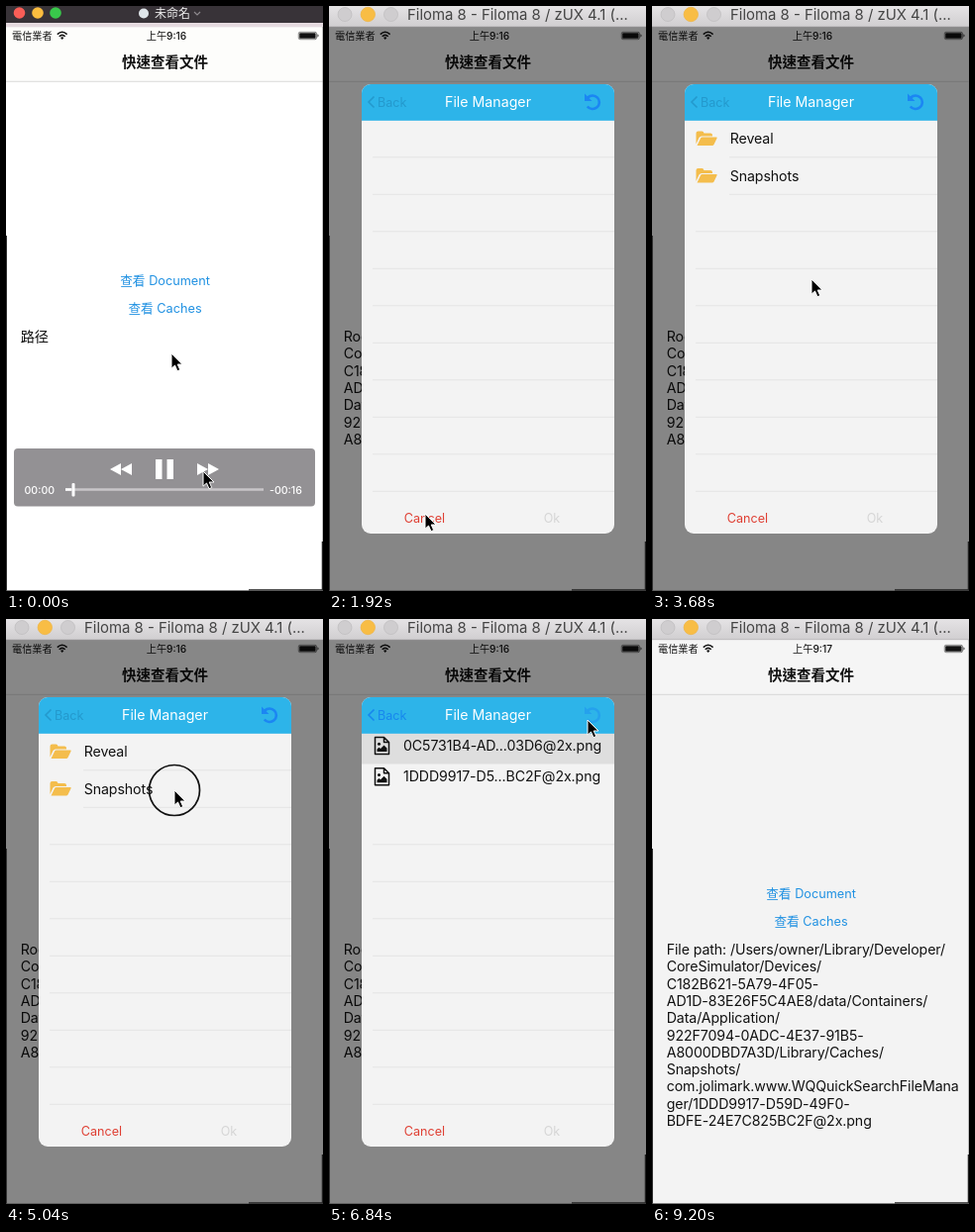
These frames come from a looping animation (320 by 591 pixels, 9.24 s). An HTML page:

```html
<!DOCTYPE html>
<html lang="zh-Hant">
<head>
<meta charset="utf-8">
<style>
html, body { margin: 0; width: 100%; height: 100%; overflow: hidden; background: #fff; }
svg { display: block; width: 100%; height: 100%; }
text { font-family: Inter, "Noto Sans CJK SC", "Noto Sans CJK TC", "Noto Sans CJK", sans-serif; white-space: pre; }
.mid { text-anchor: middle; }
.body { font-size: 14.2px; letter-spacing: -.1px; fill: #111; }
.link { font-size: 12.7px; fill: #2091e2; text-anchor: middle; }
</style>
</head>
<body>
<svg id="stage" viewBox="0 0 320 591" preserveAspectRatio="none">
  <defs>
    <linearGradient id="chrome" x2="0" y2="1">
      <stop stop-color="#e5e3e5"/><stop offset="1" stop-color="#d0ced0"/>
    </linearGradient>
    <clipPath id="card"><rect x="33" y="79" width="255" height="454" rx="9"/></clipPath>
    <path id="arrow" d="M0 0V15.2L3.5 12L6 17.7L8.7 16.5L6.2 11H11Z" stroke="#fff" stroke-width="1" stroke-linejoin="round"/>
    <g id="folder" fill="#f4bd4c">
      <path d="M0 13V2Q0 0 2 0H6Q7.5 0 8 2H14.5Q16.5 2 16.5 4V5H5.5Q4 5 3 6.5Z"/>
      <path d="M1 14.5L4.6 7Q5 6 6.3 6H20.5Q21.5 6 21 7.2L18 13.5Q17.5 14.5 16.3 14.5Z"/>
    </g>
    <g id="picture" fill="none" stroke="#111" stroke-width="1.5" stroke-linejoin="round">
      <path d="M1 1H10L15 6V18H1ZM10 1V6H15"/>
      <path d="M3 15.5V13L5 11.2L6.5 12.5L10 9L13 12V15.5Z" fill="#111" stroke="none"/>
      <circle cx="5" cy="7.7" r="1.5" fill="#111" stroke="none"/>
    </g>
    <g id="transport" fill="#fff">
      <path d="M105 468L116 462V474ZM116 468L127 462V474ZM193 462L204 468L193 474ZM204 462L215 468L204 474Z"/>
      <path d="M151 458H157.500V478H151ZM162.500 458H169V478H162.500Z"/>
    </g>
  </defs>

  <rect id="page" width="320" height="591"/>
  <rect id="nav" y="20" width="320" height="56"/>
  <path d="M0 76.300H320" stroke="#d0d0d0" stroke-width=".8"/>
  <g fill="#111">
    <text x="6" y="33.700" font-size="10.2">電信業者</text>
    <text id="clock" class="mid" x="162" y="33.700" font-size="10.2" font-weight="500"></text>
    <g fill="none" stroke="#111" stroke-width="1.500">
      <path d="M51.800 28.600Q56.700 24 61.600 28.600M53.700 30.800Q56.700 28 59.700 30.800"/>
    </g>
    <path d="M55 32Q56.700 30.700 58.400 32L56.700 34Z"/>
    <rect x="295.300" y="26.300" width="18.200" height="7.400" rx="1.500" fill="none" stroke="#111" stroke-width=".5"/>
    <rect x="296.200" y="27.200" width="16.400" height="5.600" rx=".6"/>
    <path d="M314.500 28.300Q316.500 30 314.500 31.800Z"/>
    <text class="mid" x="160.500" y="62.300" font-size="14.5" font-weight="700">快速查看文件</text>
  </g>
  <text id="doc" class="link" x="160.500" y="282">查看 Document</text>
  <text id="caches" class="link" x="160.500" y="310">查看 Caches</text>
  <g id="info" class="body"></g>

  <g id="ghost">
    <rect x="8" y="447" width="304" height="59" fill="#f2f2f2"/>
    <use href="#transport"/>
  </g>

  <g id="modal">
    <rect y="20" width="320" height="571" fill="#000" opacity=".45"/>
    <g clip-path="url(#card)">
      <rect x="33" y="79" width="255" height="454" fill="#f3f3f3"/>
      <g id="lists"></g>
      <rect x="33" y="79" width="255" height="36.800" fill="#2db4e9"/>
    </g>
    <text class="mid" x="160.500" y="102" font-size="14.2" fill="#fff">File Manager</text>
    <g id="back">
      <path d="M45.500 91.500L40 97L45.500 102.500" fill="none" stroke="currentColor" stroke-width="1.600"/>
      <text x="49" y="101.700" font-size="12.6" fill="currentColor">Back</text>
    </g>
    <g id="reload">
      <path d="M261.200 92.500A6.800 6.800 0 1 1 260.800 101.500" fill="none" stroke="#1b86f3" stroke-width="2.600"/>
      <path d="M258 88.500V96H265.500Z" fill="#1b86f3"/>
    </g>
    <text class="mid" x="96.500" y="521.500" font-size="12.6" fill="#df3f33">Cancel</text>
    <text id="ok" class="mid" x="225" y="521.500" font-size="12.6">Ok</text>
  </g>

  <circle id="ring" r="25.500" fill="none" stroke="#111" stroke-width="1.700"/>
  <use id="cursor" href="#arrow"/>

  <rect width="320" height="21" fill="url(#chrome)"/>
  <path d="M0 20.700H320" stroke="#b5b3b5" stroke-width=".7"/>
  <g stroke="#bebcbe" stroke-width=".7" fill="#cfcdcf">
    <circle cx="16" cy="8.500" r="7"/><circle cx="62.500" cy="8.500" r="7"/>
    <circle cx="39.300" cy="8.500" r="7.200" fill="#f8bd45" stroke="#f0b440"/>
  </g>
  <text x="79" y="14.400" font-size="14.9" fill="#444">Filoma 8 - Filoma 8 / zUX 4.1 (...</text>

  <g id="player">
    <rect width="320" height="21" fill="#e6dbe0"/>
    <rect width="320" height="17" fill="#383338"/>
    <circle cx="13.500" cy="7" r="5.800" fill="#f95e57"/>
    <circle cx="32" cy="7" r="5.800" fill="#fbbd3f"/>
    <circle cx="50" cy="7" r="5.800" fill="#39c84b"/>
    <circle cx="139" cy="7.500" r="5" fill="#dfe5e9"/>
    <text x="150" y="11.500" font-size="12" fill="#eee">未命名</text>
    <path d="M190 6L193 9L196 6" fill="none" stroke="#8e898e" stroke-width="1.200"/>
    <rect x="8" y="447" width="304" height="58.500" rx="4" fill="#939194"/>
    <use href="#transport"/>
    <path d="M60 488.500H260" stroke="#c8c6c9" stroke-width="2.500"/>
    <path d="M60 488.500H66" stroke="#fff" stroke-width="2.500"/>
    <rect x="66.500" y="482" width="3" height="13.500" rx="1" fill="#fff"/>
    <g font-size="10.6" font-weight="500" fill="#fff">
      <text x="18.500" y="492.500">00:00</text><text x="266" y="492.500">-00:16</text>
    </g>
    <use href="#arrow" x="199" y="470"/>
  </g>
  <path d="M.5 232V591" stroke="#333"/>
  <path d="M319.700 21V541" stroke="#888" stroke-width=".6"/>
  <path d="M0 590.600H245" stroke="#555" stroke-width=".8"/>
  <path d="M245 590H319.500V541" fill="none" stroke="#222" stroke-width="1.500"/>
</svg>
<script>
const LOOP = 9240;
const el = id => document.getElementById(id);
const set = (id, attrs) => { for (const k in attrs) el(id).setAttribute(k, attrs[k]); };
const clamp = v => Math.max(0, Math.min(1, v));
const ramp = (t, a, b) => clamp((t - a) / (b - a));
const within = (t, a, b) => t >= a && t < b;
const show = (id, on) => set(id, { visibility: on ? 'inherit' : 'hidden' });

const home = ['/Users/owner/Library/Developer/', 'CoreSimulator/Devices/', 'C182B621-5A79-4F05-',
  'AD1D-83E26F5C4AE8/data/Containers/', 'Data/Application/', '922F7094-0ADC-4E37-91B5-'];
const [first, ...rest] = home;
const app = 'A8000DBD7A3D/';
const notes = [
  [0, ['路径']],
  [1260, ['Root: ' + first, ...rest, app + 'Documents']],
  [3180, ['Root: ' + first, ...rest, app + 'Library/Caches']],
  [8440, ['File path: ' + first, ...rest, app + 'Library/Caches/', 'Snapshots/',
    'com.jolimark.www.WQQuickSearchFileMana', 'ger/1DDD9917-D59D-49F0-', 'BDFE-24E7C825BC2F@2x.png']]
];

// start, icon, row height, names
const lists = [
  [0, 'folder', 37.5, []],
  [3000, 'folder', 37.5, ['Reveal', 'Snapshots']],
  [5240, 'folder', 37.5, ['com.jolimark....Manager']],
  [6020, 'picture', 31.2, ['0C5731B4-AD...03D6@2x.png', '1DDD9917-D5...BC2F@2x.png']]
];

// time, x, y
const track = [
  [0, 167, 351], [300, 167, 351], [800, 150, 280], [1280, 150, 280], [1900, 97, 513],
  [2280, 97, 513], [2680, 140, 366], [2960, 152, 304], [3180, 152, 304], [3680, 161, 276],
  [4200, 161, 276], [4800, 170, 173], [5250, 170, 173], [5650, 160, 134], [5900, 160, 134],
  [6150, 160, 128], [6400, 160, 128], [6840, 261, 102], [7040, 264, 98], [7450, 180, 159],
  [7750, 180, 159], [8150, 225, 513], [8700, 225, 513]
];
const clicks = [830, 2060, 3000, 4950, 5700, 6200, 6920, 7500, 8220];
const fades = [[1240, 1480, 2200, 2440], [3120, 3360, 8360, 8620]];

const latest = (items, t) => items.reduce((n, item, i) => t >= item[0] ? i : n, 0);

function place(t) {
  const i = latest(track, t), a = track[i], b = track[i + 1] || a;
  const p = b === a ? 0 : ramp(t, a[0], b[0]);
  const e = p * p * (3 - 2 * p);
  return [a[1] + (b[1] - a[1]) * e, a[2] + (b[2] - a[2]) * e];
}

function rows([, icon, height, names]) {
  const isFile = icon === 'picture';
  let out = '';
  for (let i = 0; i < 10; i++) {
    if (isFile && i < 2) continue;
    const y = 152.8 + i * 37.5;
    out += `<path d="M${i < names.length ? 78 : 44} ${y}H288" stroke="#dedede" stroke-width=".7"/>`;
  }
  names.forEach((name, i) => {
    const y = (isFile ? 128 : 134) + i * height;
    if (isFile) out += `<rect id="pick${i}" x="33" y="${y - 12.5}" width="255" height="31" fill="#dedede"/>`;
    out += `<use href="#${icon}" x="${isFile ? 45.5 : 44.5}" y="${y - (isFile ? 9.5 : 7.5)}"/>
      <text class="body" x="${isFile ? 75 : 78.7}" y="${y + 5}">${name}</text>`;
  });
  return out;
}

el('lists').innerHTML = lists.map((list, i) => `<g id="list${i}">${rows(list)}</g>`).join('');
el('info').innerHTML = notes.map(([, lines], n) => `<g id="note${n}">` +
  lines.map((line, i) => `<text x="14.7" y="${339 + i * 17.3}">${line}</text>`).join('') + '</g>').join('');

function draw(t) {
  const early = t < 1260;
  set('page', { fill: early ? '#fff' : '#f3f3f3' });
  set('nav', { fill: early ? '#fdfdfb' : '#f5f5f5' });
  el('clock').textContent = t < 7800 ? '上午9:16' : '上午9:17';
  set('player', { opacity: 1 - ramp(t, 200, 600) });
  show('ghost', within(t, 200, 1260));

  const docHeld = within(t, 870, 1240);
  set('doc', { opacity: docHeld ? .2 : 1, style: docHeld ? 'fill:#777' : '' });
  set('caches', { opacity: within(t, 3010, 3180) ? .2 : 1 });
  const note = latest(notes, t), list = latest(lists, t);
  notes.forEach((_, i) => show('note' + i, i === note));
  lists.forEach((_, i) => show('list' + i, i === list));

  const alpha = Math.max(...fades.map(([a, b, c, d]) => ramp(t, a, b) - ramp(t, c, d)));
  set('modal', { opacity: alpha });
  show('modal', alpha > 0);
  set('back', { color: list > 1 ? '#1787ee' : '#2499cd' });
  set('reload', { opacity: within(t, 6760, 7080) ? .4 : 1 });
  if (list === 3) {
    show('pick0', within(t, 6220, 7080));
    show('pick1', t >= 7520);
  }
  set('ok', { fill: t >= 7520 ? '#2db4e9' : '#d5d5d5' });

  const [x, y] = place(t);
  set('cursor', { transform: `translate(${x} ${y})` });
  show('cursor', t < 8800);
  const click = clicks.filter(c => c <= t).pop();
  set('ring', { cx: x, cy: y, opacity: click === undefined ? 0 : 1 - ramp(t, click + 140, click + 340) });
}

function frame(now) {
  draw(now % LOOP);
  requestAnimationFrame(frame);
}
draw(0);
requestAnimationFrame(frame);
</script>
</body>
</html>
```
